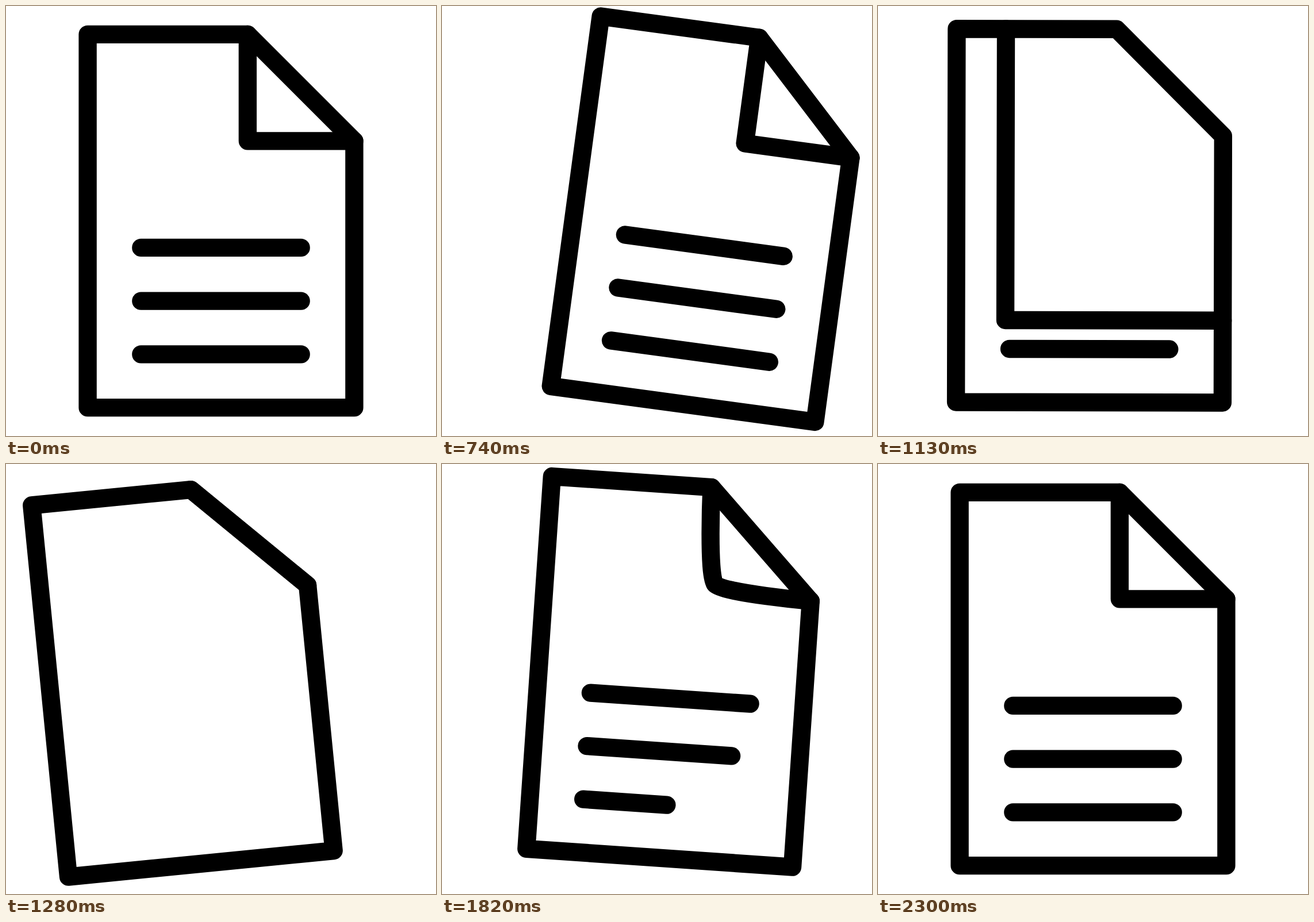
Write an HTML page that moves like this. It is 748 px wide and 748 px high and loops after 2330 ms.

```html
<!DOCTYPE html>
<html lang="en">
<head>
<meta charset="utf-8">
<title>Document</title>
<style>
  html, body { margin: 0; width: 100%; height: 100%; overflow: hidden; background: #fff; }
  svg { display: block; width: 100vw; height: 100vh; }
</style>
</head>
<body>
<svg viewBox="0 0 748 748">
  <g id="page" fill="none" stroke="#000" stroke-width="1.015" stroke-linecap="round" stroke-linejoin="round">
    <path id="lines"/>
    <path id="cover" fill="#fff" stroke="none"/>
    <path id="fold"/>
    <path d="M-7.5-10.5H1.5L7.5-4.5V10.5H-7.5Z"/>
  </g>
</svg>
<script>
const LOOP = 2330, HOLD = 500, STEP = 30, UNIT = 30.92, END = 60;
const SWEPT = 26; // step at which the flap has cleared the sheet
const el = id => document.getElementById(id);
const page = el("page"), lines = el("lines"), cover = el("cover"), fold = el("fold");

// Turning points of each damped swing: [step, value]
const swayX = [[10.8, 105], [28.8, -78], [45.5, 29]];
const swayY = [[20, -9.5], [32, 6], [45, -13]];
const tilt = [[10.7, 8.4], [30.3, -6.5], [47, 4.3]];

// Window in which each text line is written
const writing = [[SWEPT, 37.8], [30.4, 47.3], [35, 52.5]];

// Symmetric ease in and out; a higher power is steeper in the middle
function ease(k, from, to, power = 1.6) {
  const u = Math.min(1, Math.max(0, (k - from) / (to - from)));
  const a = u ** power, b = (1 - u) ** power;
  return a / (a + b);
}

// Rest, through the turning points, back to rest
function swing(k, turns, power) {
  let from = 0, value = 0;
  for (const [to, next] of [...turns, [END, 0]]) {
    if (k <= to) return value + (next - value) * ease(k, from, to, power);
    [from, value] = [to, next];
  }
  return 0;
}

function drawFold(k) {
  if (k < SWEPT) {
    // The flap sweeps over the whole sheet
    const p = ease(k, 12.7, SWEPT), x = 1.5 - 9 * p, y = -4.5 + 15 * p;
    fold.setAttribute("d", `M${x} -10.5V${y}H7.5`);
    cover.setAttribute("d", `M${x} -10.5H1.5L7.5 -4.5V${y}H${x}Z`);
  } else {
    // A new flap bulges out of the cut corner
    const p = ease(k, 28, 50.5), x = 4.5 - 3 * p, y = -7.5 + 3 * p, t = 2.4 * (1 - p);
    fold.setAttribute("d", `M1.5 -10.5C1.5 -10.5 ${x - t} ${y - t} ${x} ${y}`
      + `C${x + t} ${y + t} 7.5 -4.5 7.5 -4.5`);
    cover.setAttribute("d", "");
  }
}

function drawLines(k) {
  let d = "";
  writing.forEach(([from, to], i) => {
    const len = 9 * (k < SWEPT ? 1 : ease(k, from, to));
    if (len > 0) d += `M-4.5 ${1.5 + 3 * i}h${len}`;
  });
  lines.setAttribute("d", d);
}

function draw(ms) {
  const k = Math.max(0, Math.floor((ms % LOOP - HOLD) / STEP));
  const x = 374 + swing(k, swayX), y = 374 + swing(k, swayY);
  page.setAttribute("transform",
    `translate(${x} ${y}) rotate(${swing(k, tilt, 2.2)}) scale(${UNIT})`);
  drawLines(k);
  drawFold(k);
}

const start = performance.now();
function tick() {
  draw(performance.now() - start);
  requestAnimationFrame(tick);
}
tick();
</script>
</body>
</html>
```
